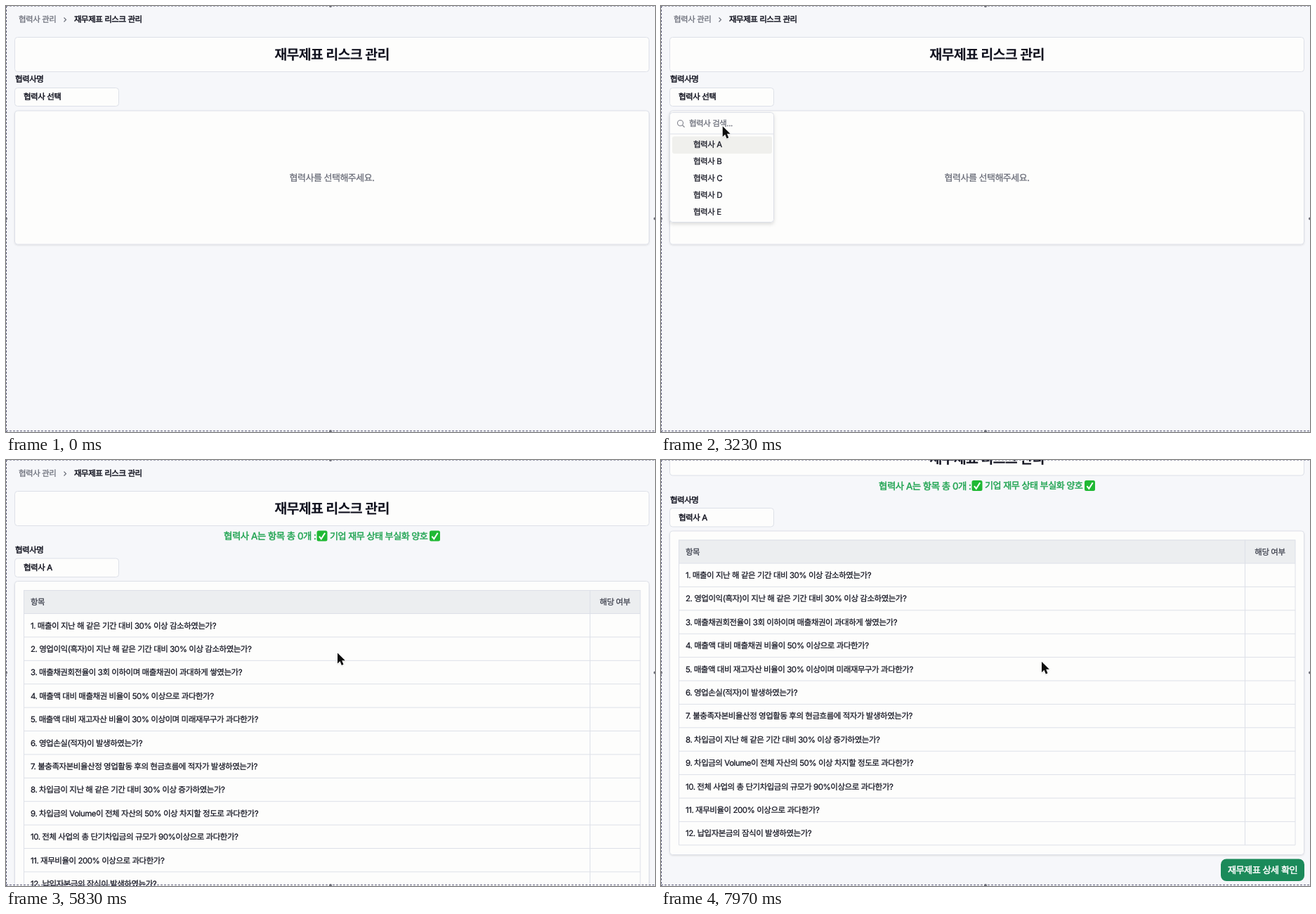
An HTML page for the animation above (8 s loop, 924 px wide and 606 px high).

```html
<!DOCTYPE html>
<html lang="ko">
<head>
<meta charset="utf-8">
<title>재무제표 리스크 관리</title>
<style>
html, body { margin: 0; width: 100%; height: 100%; overflow: hidden; background: #f6f7fa; }
svg { display: block; width: 100vw; height: 100vh; }
text {
  font-family: Inter, "Noto Sans CJK KR", "Noto Sans CJK", sans-serif;
  letter-spacing: -.04em; text-rendering: geometricPrecision;
  color: #11121f; fill: currentColor; stroke: currentColor; stroke-width: .22;
}
.strong { stroke-width: .45; }
.bold { font-weight: 600; stroke: none; }
.muted { color: #666975; }
.head { color: #3a3d4a; }
.good { color: #21a452; }
.light { color: #fff; }
</style>
</head>
<body>
<svg id="stage" viewBox="0 0 924 606" xmlns="http://www.w3.org/2000/svg"></svg>
<script>
const LOOP = 8000;
const OPEN = 2260, PICK = 4700;
const CARD = '#fdfdfc', LINE = '#dde0e8';

// Text centred vertically on y
const label = (x, y, s, cls = '', size = 11.5, anchor = 'start') =>
  `<text x="${x}" y="${y + size * .375}" font-size="${size}" class="${cls}" text-anchor="${anchor}">${s}</text>`;
const box = (x, y, w, h, attrs = '') =>
  `<rect x="${x}" y="${y}" width="${w}" height="${h}" rx="4" fill="${CARD}" stroke="${LINE}" ${attrs}/>`;
const line = (x1, y1, x2, y2) =>
  `<path d="M${x1} ${y1}L${x2} ${y2}" stroke="${LINE}"/>`;
const check = (x, y) =>
  `<g transform="translate(${x} ${y})"><rect width="15" height="15" rx="2.5" fill="#20b934"/>
   <path d="M3.4 8.2L6.3 11.7L11.7 3.3" fill="none" stroke="#fff" stroke-width="2"/></g>`;

const questions = [
  '매출이 지난 해 같은 기간 대비 30% 이상 감소하였는가?',
  '영업이익(흑자)이 지난 해 같은 기간 대비 30% 이상 감소하였는가?',
  '매출채권회전율이 3회 이하이며 매출채권이 과대하게 쌓였는가?',
  '매출액 대비 매출채권 비율이 50% 이상으로 과다한가?',
  '매출액 대비 재고자산 비율이 30% 이상이며 미래재무구가 과다한가?',
  '영업손실(적자)이 발생하였는가?',
  '불충족자본비율산정 영업활동 후의 현금흐름에 적자가 발생하였는가?',
  '차입금이 지난 해 같은 기간 대비 30% 이상 증가하였는가?',
  '차입금의 Volume이 전체 자산의 50% 이상 차지할 정도로 과다한가?',
  '전체 사업의 총 단기차입금의 규모가 90%이상으로 과다한가?',
  '재무비율이 200% 이상으로 과다한가?',
  '납입자본금의 잠식이 발생하였는가?'
];
const ROW = 33.4, TOP = 218.5;

const header =
  label(18, 19, '협력사 관리', 'muted') +
  '<path d="M82.5 16.5L85.5 19.5L82.5 22.5" fill="none" stroke="#666975" stroke-width="1.1"/>' +
  label(97, 19, '재무제표 리스크 관리', 'strong') +
  box(12.5, 44.5, 903, 49) +
  label(464, 69, '재무제표 리스크 관리', 'bold', 19.6, 'middle');

const empty =
  label(13, 104, '협력사명', 'strong') +
  box(12.5, 116.5, 148, 26, 'id="trigger"') +
  label(25, 129, '협력사 선택', 'strong') +
  box(12.5, 149, 903, 190, 'filter="url(#soft)"') +
  label(464, 244, '협력사를 선택해주세요.', 'muted', 13, 'middle');

const rows = questions.map((q, i) =>
  label(35, 235.2 + i * ROW, `${i + 1}. ${q}`) +
  line(25.5, TOP + (i + 1) * ROW, 903, TOP + (i + 1) * ROW)).join('');

const result =
  label(310, 108, '협력사 A는 항목 총 0개 :', 'good strong', 13.5) + check(442.5, 100.5) +
  label(461, 108, '기업 재무 상태 부실화 양호', 'good strong', 13.1) + check(603, 100.5) +
  label(13, 128, '협력사명', 'strong') +
  box(12.5, 140, 148, 26.5) +
  label(25, 153, '협력사 A', 'strong') +
  box(12.5, 172.5, 903, 460.5, 'filter="url(#soft)"') +
  '<rect x="25" y="185" width="878" height="33.5" fill="#eceef0"/>' +
  label(35, 202, '항목', 'head') +
  label(867, 202, '해당 여부', 'head', 11.5, 'middle') +
  line(25.5, 185.5, 903, 185.5) + line(25.5, TOP, 903, TOP) + rows +
  [25.5, 831.5, 903].map(x => line(x, 185, x, TOP + 12 * ROW)).join('') +
  '<rect x="797" y="639" width="119" height="31.5" rx="8" fill="#1b8a5a"/>' +
  label(856.5, 654.7, '재무제표 상세 확인', 'light strong', 13.2, 'middle');

const popup =
  box(12.5, 151.5, 148, 156, 'filter="url(#drop)"') +
  '<g fill="none" stroke="#80828c" stroke-width="1.1"><circle cx="27.5" cy="166.5" r="4"/><path d="M30.5 169.5L33.5 172.5"/></g>' +
  label(40, 167, '협력사 검색...', 'muted') +
  '<path id="caret" d="M40.5 161.5V172.5" stroke="#11121f"/>' +
  line(13, 182, 160, 182) +
  '<rect x="16" y="185.5" width="142" height="24.5" rx="3" fill="#f0f0ed"/>' +
  [...'ABCDE'].map((c, i) => label(46, 197 + i * 23.8, '협력사 ' + c)).join('');

const frame =
  `<g fill="none" stroke="#5d5d78" stroke-dasharray="3 2">
   <path d="M0 0H924M.5 0V606M0 604.5H924"/></g>
   <g fill="#6c6d78"><circle cx="462" cy="0" r="2"/><circle cx="462" cy="605" r="2"/>
   <circle cx="0" cy="302.5" r="2"/><circle cx="924" cy="302.5" r="2"/></g>`;

const arrow =
  `<path id="cursor" d="M0 0V15L3.5 11.7L5.9 17.4L8.5 16.3L6.2 10.7H10.9Z" fill="#0a0a0a"
   stroke="#fff" stroke-width="1.2" stroke-linejoin="round" paint-order="stroke" filter="url(#soft)"/>`;

document.getElementById('stage').innerHTML =
  `<defs>
   <filter id="soft" x="-20%" y="-20%" width="140%" height="140%"><feDropShadow dx="0" dy="1" stdDeviation=".8" flood-opacity=".1"/></filter>
   <filter id="drop" x="-20%" y="-20%" width="140%" height="140%"><feDropShadow dx="0" dy="2.5" stdDeviation="2.5" flood-opacity=".13"/></filter>
   </defs>
   <rect width="924" height="606" fill="#f6f7fa"/>
   <g id="page">${header}<g id="empty">${empty}</g><g id="result">${result}</g></g>
   <g id="popup">${popup}</g>${frame}${arrow}`;

const el = {};
for (const id of ['page', 'empty', 'result', 'popup', 'trigger', 'caret', 'cursor'])
  el[id] = document.getElementById(id);

const clamp = v => Math.min(1, Math.max(0, v));
const ramp = (t, a, b) => clamp((t - a) / (b - a));
const smooth = p => p * p * (3 - 2 * p);
const show = (node, on) => node.setAttribute('display', on ? 'inline' : 'none');

// time, x, y of the pointer tip
const path = [
  [850, 180, -22], [1430, 76.5, 114], [1750, 69.5, 123.5], [2750, 69.5, 123.5],
  [3600, 100, 203], [4270, 102, 205], [4800, 102, 205], [5600, 472, 274.5],
  [5880, 472, 274.5], [6300, 479.5, 264.5], [6750, 479.5, 264.5], [7600, 542, 287], [8000, 542, 287]
];

function pointer(t) {
  const i = path.findIndex(k => k[0] > t);
  if (i < 1) return path[0].slice(1);
  const [a, b] = [path[i - 1], path[i]];
  const p = smooth(ramp(t, a[0], b[0]));
  return [a[1] + (b[1] - a[1]) * p, a[2] + (b[2] - a[2]) * p];
}

function draw(t) {
  const [x, y] = pointer(t);
  el.cursor.setAttribute('transform', `translate(${x} ${y})`);

  const hover = ramp(t, 1490, 1640) * (1 - ramp(t, 3060, 3210));
  const mix = (a, b) => Math.round(a + (b - a) * hover);
  el.trigger.setAttribute('fill', `rgb(${mix(253, 237)},${mix(253, 237)},${mix(252, 240)})`);

  show(el.empty, t < PICK);
  show(el.result, t >= PICK);

  const enter = 1 - (1 - ramp(t, OPEN, OPEN + 150)) ** 2;
  const leave = ramp(t, PICK, PICK + 120);
  const shown = enter * (1 - leave);
  show(el.popup, shown > 0);
  el.popup.setAttribute('opacity', shown);
  const scale = .95 + .05 * shown;
  el.popup.setAttribute('transform',
    `translate(86.5 ${151 - 7 * (1 - enter)}) scale(${scale}) translate(-86.5 -151)`);
  show(el.caret, (t - OPEN) % 1060 < 530);

  el.page.setAttribute('transform', `translate(0 ${-71.5 * smooth(ramp(t, 6204, 6744))})`);
}

function tick() {
  draw(performance.now() % LOOP);
  requestAnimationFrame(tick);
}
tick();
</script>
</body>
</html>
```
